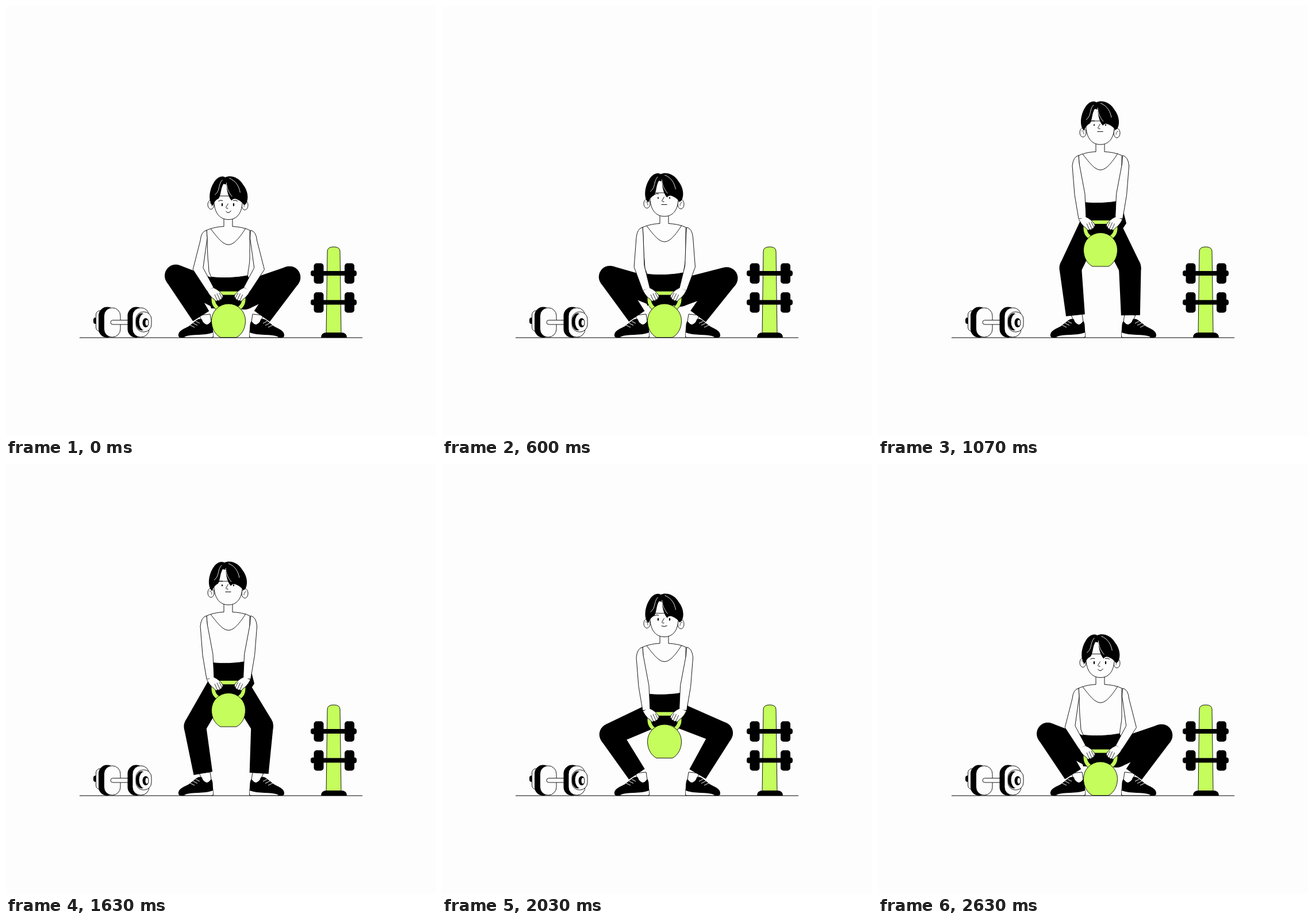
Animation of 748 by 748 pixels, one loop 2.66 s. Source, as an HTML page with a canvas:

```html
<!DOCTYPE html>
<html lang="en">
<head>
<meta charset="utf-8">
<title>Kettlebell squat</title>
<style>
  html, body { margin: 0; width: 100%; height: 100%; overflow: hidden; background: #fdfdfd; }
  canvas { display: block; width: 748px; height: 748px; }
</style>
</head>
<body>
<canvas id="stage" width="748" height="748"></canvas>
<script>
const ctx = document.getElementById('stage').getContext('2d');
const LOOP = 2660, FLOOR = 577;
const WHITE = '#fdfdfd', BLACK = '#000', GREEN = '#c4fd5c';

// Each track is a list of [time, value] keys.
const tracks = {
  body: [[0, 384], [300, 385.5], [450, 385.3], [600, 379], [700, 360], [800, 319], [900, 277],
    [1070, 254], [1250, 252.8], [1400, 253.2], [1630, 258], [1930, 275], [2050, 322],
    [2130, 373], [2200, 389], [2250, 391], [2450, 386.5], [2630, 384], [LOOP, 384]],
  headDrop: [[0, 0.5], [600, 0], [1930, 0], [2200, 3.5], [2280, 3.5], [2600, 0.5], [LOOP, 0.5]],
  nod: [[0, 1], [300, 0.85], [600, 0.25], [900, 0], [1630, 0], [1930, 0.1], [2200, 1.1], [2600, 1], [LOOP, 1]],
  smile: [[0, 1], [250, 0.9], [560, 0], [1930, 0], [2180, 1], [LOOP, 1]],
  eye: [[0, 2.8], [250, 2.6], [600, 1.2], [1070, 1.2], [1630, 1.6], [1930, 2.5], [2200, 2.6], [LOOP, 2.8]]
};

// Monotone cubic interpolation: smooth, without overshoot between keys.
function sample(keys, t) {
  let i = 0;
  while (i < keys.length - 2 && t > keys[i + 1][0]) i++;
  const slope = k => keys[k] && keys[k + 1]
    ? (keys[k + 1][1] - keys[k][1]) / (keys[k + 1][0] - keys[k][0]) : 0;
  const tangent = k => {
    const a = slope(k - 1), b = slope(k);
    return a * b <= 0 ? 0 : 2 * a * b / (a + b);
  };
  const [t0, v0] = keys[i], [t1, v1] = keys[i + 1];
  const span = t1 - t0, u = (t - t0) / span, u2 = u * u, u3 = u2 * u;
  return v0 * (2 * u3 - 3 * u2 + 1) + v1 * (3 * u2 - 2 * u3)
    + span * (tangent(i) * (u3 - 2 * u2 + u) + tangent(i + 1) * (u3 - u2));
}

function shape(d, fill, stroke, width = 0.9) {
  const path = new Path2D(d);
  if (fill) { ctx.fillStyle = fill; ctx.fill(path); }
  if (stroke) { ctx.strokeStyle = stroke; ctx.lineWidth = width; ctx.stroke(path); }
}

function oval(x, y, rx, ry, fill, stroke) {
  ctx.beginPath();
  ctx.ellipse(x, y, rx, ry, 0, 0, Math.PI * 2);
  if (fill) { ctx.fillStyle = fill; ctx.fill(); }
  if (stroke) { ctx.strokeStyle = stroke; ctx.lineWidth = 0.9; ctx.stroke(); }
}

function block(x, y, w, h, r, fill, stroke) {
  ctx.beginPath();
  ctx.roundRect(x, y, w, h, r);
  ctx.fillStyle = fill;
  ctx.fill();
  if (stroke) { ctx.strokeStyle = stroke; ctx.lineWidth = 0.9; ctx.stroke(); }
}

function shifted(dx, dy, draw) {
  ctx.save();
  ctx.translate(dx, dy);
  draw();
  ctx.restore();
}

function mirrored(axis, draw) {
  draw();
  ctx.save();
  ctx.translate(2 * axis, 0);
  ctx.scale(-1, 1);
  draw();
  ctx.restore();
}

// Middle joint of a two-bone limb; a limb pointing down bends left for side 1, right for -1.
function joint([ax, ay], [bx, by], l1, l2, side) {
  const dx = bx - ax, dy = by - ay, d = Math.hypot(dx, dy);
  const along = (l1 * l1 - l2 * l2 + d * d) / (2 * d);
  const out = side * Math.sqrt(Math.max(0, l1 * l1 - along * along));
  return [ax + (dx * along - dy * out) / d, ay + (dy * along + dx * out) / d];
}

function direction([ax, ay], [bx, by]) {
  const d = Math.hypot(bx - ax, by - ay);
  return [(bx - ax) / d, (by - ay) / d];
}

// Point beside p, at distance r across direction d; left of a downward limb.
const beside = (p, d, r) => [p[0] - d[1] * r, p[1] + d[0] * r];

function floorDumbbell() {
  block(152, 542, 12, 11, 4, BLACK);
  block(156.5, 530, 14, 36, 7, WHITE, BLACK);
  block(161, 523.5, 30, 53.5, 15, BLACK);
  block(170.5, 525, 28.5, 51, 14, WHITE, BLACK);
  block(182, 546.5, 34, 7.5, 4, WHITE, BLACK);
  block(211.5, 523.5, 30, 53.5, 15, BLACK);
  block(220, 525, 29, 51, 14, WHITE, BLACK);
  block(226, 532, 27, 35, 13, WHITE, BLACK);
  oval(236, 549.5, 10, 15, BLACK);
  oval(241, 549.5, 9.5, 14.5, WHITE);
  oval(243, 551, 5.5, 8, BLACK);
  oval(245, 551, 2.5, 5, WHITE);
}

function rack() {
  shape('M557 572 L559 427 Q559 419 570 419 Q581 419 581 427 L583 572 Z', GREEN, BLACK);
  shape('M548 577 Q548 568 558 568 H583 Q593 568 593 577 Z', BLACK);
  for (const y of [465, 515.5]) {
    block(534, y - 4, 72, 8, 2, BLACK);
    for (const x of [530, 602]) block(x, y - 5, 8, 10, 4, BLACK);
    for (const x of [535.5, 589]) block(x, y - 17.5, 17, 35.5, 5, BLACK);
  }
}

function shoe() {
  shape('M336 538 L355 536 L357 549 L350 556 L342 550 Z', WHITE, BLACK);
  shape('M300 574 C299 565 309 562 318 557 L332 546 Q337 543 341 545.5 C343 553 350 559 357 548'
    + ' C361 552 359 562 361 570 L361 575 Q361 577 358 577 H304 Q301 577 300 574 Z', BLACK);
  shape('M310 575.5 C324 570 345 574 360.3 568 V574 Q360 576.2 358 576.2 H312 Z', WHITE);
  shape('M320 555 l8 4 M325 551.5 l8 4 M330 548.5 l7 3.5', null, WHITE, 1);
}

function leg(hip, foot, side, squat) {
  const knee = joint(hip, foot, 86, 93, side);
  const thigh = direction(hip, knee), shin = direction(knee, foot);
  const cuff = [foot[0] - shin[0] * 10, foot[1] - shin[1] * 10];
  // Positive r lies on the side the knee points to.
  const edge = (p, d, r) => beside(p, d, r * side);
  const fill = points => {
    ctx.beginPath();
    points.forEach(p => ctx.lineTo(...p));
    ctx.closePath();
    ctx.fill();
  };
  ctx.fillStyle = BLACK;
  fill([edge(hip, thigh, 20 + 8 * squat), edge(knee, thigh, 19.3), edge(knee, thigh, -19.3), edge(hip, thigh, -20)]);
  fill([edge(knee, shin, 19.3), edge(cuff, shin, 16.5), edge(cuff, shin, -16.5), edge(knee, shin, -19.3)]);
  oval(...knee, 19.3, 19.3, BLACK);
  oval(...hip, 20, 20, BLACK);
}

function legs(body) {
  const hipY = body + 124;
  const squat = Math.min(1, Math.max(0, (body - 275) / 105));
  leg([372, hipY], [344.5, 548], 1, squat);
  leg([400 + (body - 254) * 0.115, hipY], [439.5, 548], -1, squat);
  shifted(0, body, () =>
    shape('M356.5 84 H420.5 L427 104 L432 124 L420 142 H357 L351 124 L355 104 Z', BLACK));
}

function torso() {
  shape('M379 -17 V-.5 C366 0 356 3 349 6 C351 30 350 50 352 63 L353 78 L357 87.5 Q388 91 420.5 85'
    + ' C421 75 424 66 424 55 V6 C416 2 404 0 394 -.5 V-17', WHITE, BLACK);
  shape('M356 3.5 C364 14 371 23 378 28 Q387 34.5 396 28 C404 22 411 12 417 2.5', null, BLACK);
}

function kettlebell() {
  const handle = 'M369 -51 C360 -57 360 -65 361 -74 Q361.5 -77.5 366 -77.5 H408'
    + ' Q412.5 -77.5 413 -74 C414 -65 414 -57 405 -51';
  shape(handle, null, BLACK, 7.8);
  shape(handle, null, GREEN, 6.2);
  shape('M373 -.5 C363 -6 357.5 -17 357.5 -29.5 A29.5 29.5 0 0 1 416.5 -29.5'
    + ' C416.5 -17 411 -6 401 -.5 Z', GREEN, BLACK);
}

function hand() {
  shape('M349.5 -82 L353 -76 Q357 -70 362 -67 L364.5 -64 Q367 -62.5 368 -65 Q371 -62.5 372 -66'
    + ' Q375.5 -65.5 375.5 -69 Q378 -70 377 -73.5 Q372 -82 361 -87', WHITE, BLACK);
  shape('M363 -75 L367.5 -65 M367 -77 L372 -66 M371 -78 L375.5 -69', null, BLACK, 0.8);
}

function arm(body, base) {
  const shoulder = [345, body + 18], wrist = [355.5, base - 84];
  const elbow = joint(shoulder, wrist, 56, 42, 1);
  const upper = direction(shoulder, elbow), fore = direction(elbow, wrist);
  const middle = direction([0, 0], [upper[0] + fore[0], upper[1] + fore[1]]);
  ctx.beginPath();
  ctx.moveTo(350, body + 20);
  ctx.lineTo(349, body + 6);
  ctx.quadraticCurveTo(339.5, body + 8, 338, body + 24);
  ctx.lineTo(...beside(elbow, middle, 9));
  ctx.lineTo(...beside(wrist, fore, 6.5));
  ctx.lineTo(...beside(wrist, fore, -6.5));
  ctx.lineTo(...beside(elbow, middle, -9));
  ctx.lineTo(350, body + 20);
  ctx.fillStyle = WHITE;
  ctx.fill();
  ctx.strokeStyle = BLACK;
  ctx.lineWidth = 0.9;
  ctx.stroke();
  shifted(0, base, hand);
}

function head(nod, smile, eye) {
  shifted(0, -5 * nod, () => {
    oval(356.5, 220, 5.5, 8, WHITE, BLACK);
    oval(415.5, 221, 5.5, 8.3, WHITE, BLACK);
    shape('M354 217 Q358 217 358 223 M418 218 Q414 218 414 224', null, BLACK, 0.7);
  });
  shape('M362 200 C360 228 371 241 387 241 C403 241 413 228 411 200 Z', WHITE, BLACK);

  shifted(0, 8 * nod, () => {
    oval(376, 207, 1.2, eye, BLACK);
    oval(396, 207, 1.2, eye, BLACK);
    shape('M369.5 201 Q373 198.5 377 200 M395 200 Q399 198.5 403 201', null, BLACK, 1);
    shape('M386.5 205 L382.5 212 Q383 214 386.5 213.5', null, BLACK);
    const sag = 5.5 * smile;
    shape(`M${381.5 + smile} 218.5 Q387 ${218.5 + sag} 391.5 ${218.5 - smile}`, null, BLACK, 1);
  });

  shifted(1.3 * nod, 0, () => {
    shape('M358.5 217 C350 209 352 190 360 177 C366 167 374 164 380 167.5 C391 162.5 405 169 411 180'
      + ' C420 191 421 205 416.5 213 L413 216 C409 210 404 207 398 205 Q394 204 391 208'
      + ' C385 201 383 191 382 180 L377 179 C372 187 373 197 369 204 Q361 208 358.5 217 Z', BLACK);
    shape('M375 172 C367 181 372 190 362 198 M387 169 C399 174 404 183 406 194 M382 177 C383 188 387 195 392 201',
      null, WHITE, 0.9);
  });
}

function render(t) {
  const pose = {};
  for (const name in tracks) pose[name] = sample(tracks[name], t);
  const base = Math.min(FLOOR, pose.body + 199.5);

  ctx.fillStyle = WHITE;
  ctx.fillRect(0, 0, 748, 748);
  ctx.lineJoin = 'round';
  shape(`M128 ${FLOOR} H620`, null, BLACK, 1);
  floorDumbbell();
  rack();
  mirrored(392, shoe);
  legs(pose.body);
  shifted(0, pose.body, torso);
  shifted(0, base, kettlebell);
  mirrored(387.3, () => arm(pose.body, base));
  shifted(0, pose.body - 254 + pose.headDrop, () => head(pose.nod, pose.smile, pose.eye));
}

const start = performance.now();
function tick() {
  render((performance.now() - start) % LOOP);
  requestAnimationFrame(tick);
}
tick();
</script>
</body>
</html>
```
